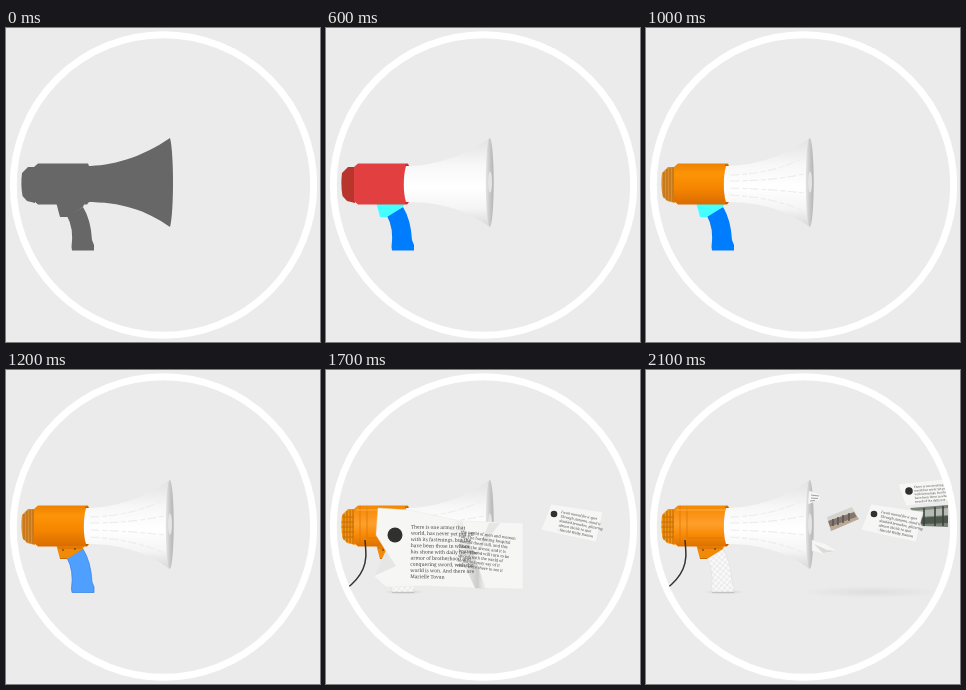
Animation of 314x314 px, one loop 3.1 s. Source, as an HTML page:

```html
<!DOCTYPE html>
<html lang="en">
<head>
<meta charset="utf-8">
<title>Megaphone</title>
<style>
  html, body { margin: 0; width: 100%; height: 100%; overflow: hidden; background: #ebebeb; }
  svg { display: block; width: 100%; height: 100%; }
  text { font-family: "Noto Serif", "Liberation Serif", serif; fill: #444; }
  .paper { fill: #f6f6f5; stroke: #e2e2e2; stroke-width: .4; }
  .mark { fill: #303030; }
</style>
</head>
<body>
<svg viewBox="0 0 314 314">
  <defs>
    <path id="cone" d="M80 138C105 138 135 130 164 110C168 125 168 184 164 199C140 182 115 174 80 174C77 165 77 148 80 138Z"/>
    <path id="body" d="M32 135.5H82L83 138V174L81 176.5H32L28 173V139Z"/>
    <path id="cap" d="M29 139H22L16 145Q14.5 157 16.5 168L21 173 29 175Z"/>
    <path id="bracket" d="M50 174H79L77 179 61 189H54Z"/>
    <path id="handle" d="M61 188L77 179Q85 192 86 212L88 217V222.5H66L65.5 219Q68 200 61 188Z"/>
    <path id="collar" d="M79 136.5H82L83 139V173L81 176H79Q81 174 80 173C77 165 77 148 80 139Z"/>
    <ellipse id="rim" cx="163.7" cy="154.5" rx="4" ry="44.5"/>
    <ellipse id="horn" cx="164" cy="154" rx="2" ry="10.5"/>

    <linearGradient id="white" x2="0" y2="1">
      <stop offset="0" stop-color="#e2e2e2"/><stop offset=".3" stop-color="#f7f7f7"/>
      <stop offset=".55" stop-color="#fff"/><stop offset=".8" stop-color="#f4f4f4"/>
      <stop offset="1" stop-color="#d8d8d8"/>
    </linearGradient>
    <linearGradient id="orange" x2="0" y2="1">
      <stop offset="0" stop-color="#ee8100"/><stop offset=".25" stop-color="#fd9406"/>
      <stop offset=".6" stop-color="#f58600"/><stop offset="1" stop-color="#d96c00"/>
    </linearGradient>
    <linearGradient id="bright" x2="0" y2="1">
      <stop offset="0" stop-color="#f58700"/><stop offset=".45" stop-color="#ff9f2c"/>
      <stop offset=".7" stop-color="#fa8b06"/><stop offset="1" stop-color="#dc7000"/>
    </linearGradient>
    <linearGradient id="metal">
      <stop offset="0" stop-color="#e8e8e8"/><stop offset=".5" stop-color="#c9c9c9"/>
      <stop offset="1" stop-color="#b4b4b4"/>
    </linearGradient>
    <linearGradient id="fold">
      <stop offset="0" stop-color="#fff" stop-opacity="0"/><stop offset=".8" stop-color="#aaa" stop-opacity=".55"/>
      <stop offset="1" stop-color="#ddd" stop-opacity=".2"/>
    </linearGradient>
    <radialGradient id="shade">
      <stop offset="0" stop-color="#888" stop-opacity=".35"/><stop offset="1" stop-color="#888" stop-opacity="0"/>
    </radialGradient>
    <pattern id="grip" width="4" height="4" patternUnits="userSpaceOnUse" patternTransform="rotate(40)">
      <path d="M0 0H4M0 0V4" stroke="#d9d9d9" stroke-width=".8"/>
    </pattern>
    <clipPath id="lens"><circle cx="157.5" cy="157" r="148"/></clipPath>
  </defs>

  <rect width="314" height="314" fill="#ebebeb"/>
  <g clip-path="url(#lens)">
    <g data-time="0 500" fill="#676767">
      <use href="#cap"/><use href="#body"/><use href="#cone"/><use href="#bracket"/><use href="#handle"/>
    </g>

    <ellipse data-time="2100" cx="225" cy="222" rx="70" ry="6" fill="url(#shade)" opacity=".4"/>
    <ellipse data-time="1300" cx="78" cy="222" rx="20" ry="2.5" fill="url(#shade)"/>

    <use data-time="500 1200" href="#handle" fill="#007cff"/>
    <use data-time="1200 1300" href="#handle" fill="#4f9fff" stroke="#2f7fe6" stroke-width=".7"/>
    <g data-time="1300">
      <use href="#handle" fill="#f9f9f9" stroke="#dedede" stroke-width=".6"/>
      <use href="#handle" fill="url(#grip)"/>
      <path d="M66 222.3H88" stroke="#bbb"/>
    </g>

    <use data-time="500 1100" href="#bracket" fill="#4ff"/>
    <g data-time="1100">
      <use href="#bracket" fill="#f18a08"/>
      <path d="M52 178H76M54 188.5L61 188.5" stroke="#c96a00" fill="none"/>
      <path d="M56 180H58M68 179H70" stroke="#8a4900" stroke-width="1.3"/>
    </g>

    <use data-time="500 1000" href="#cap" fill="#b7352d"/>
    <use data-time="1000 1400" href="#cap" fill="#dc8e2d"/>
    <use data-time="1400" href="#cap" fill="#f69410"/>
    <g data-time="1000" stroke="#a95e0c" fill="none">
      <path d="M18 144V170M21 141V172M24 140V173M27 139.5V174" stroke-width=".8"/>
      <path data-time="1400" d="M16 147H28M15.5 152H28M15.5 157H28M16 162H28M16.5 167H28" stroke="#c96c05"/>
    </g>

    <g data-time="500 800"><use href="#body" fill="#e23f40"/><use href="#collar" fill="#b02d30"/></g>
    <use data-time="800 1400" href="#body" fill="url(#orange)"/>
    <g data-time="1400">
      <use href="#body" fill="url(#bright)"/>
      <path d="M34 136V176M41 138V168M41 168H77" stroke="#d67309" stroke-width=".7" fill="none"/>
      <path d="M30 140H79" stroke="#ffb554" stroke-width=".8"/>
    </g>
    <use data-time="800" href="#collar" fill="#b95a05"/>

    <g data-time="500 600">
      <use href="#cone" fill="#ffb400"/><use href="#rim" fill="#adadad"/><use href="#horn" fill="#d0d0d0"/>
    </g>
    <g data-time="600">
      <use href="#cone" fill="url(#white)"/>
      <path data-time="700" d="M84 147Q125 146 155 131M84 153Q125 153 158 146M84 160Q125 161 158 165M84 167Q125 169 156 182"
        fill="none" stroke="#ededed" stroke-width="1.2" stroke-dasharray="9 3 5 2"/>
      <use href="#rim" fill="url(#metal)"/><use href="#horn" fill="#e4e4e4"/>
    </g>

    <path data-time="1500" d="M39 170C40 182 41 190 37 199C33 208 28 213 20 219" fill="none" stroke="#333" stroke-width="1.5"/>

    <g data-time="1600 1900" id="sheet">
      <path class="paper" d="M52 138L83 140 135 151 197 153V219L147 218 100 216 60 217 48 206 60 181 50 165Z"/>
      <path d="M118 151L136 151 160 219 149 218Z" fill="url(#fold)"/>
      <path d="M163 153L174 153 150 185Z" fill="#ccc" opacity=".4"/>
      <path d="M50 165L60 181 48 206 70 196Z" fill="#e6e6e6"/>
      <circle class="mark" cx="69" cy="165" r="7.5"/>
      <text data-lines="quote" transform="translate(85 158.5) rotate(1)" font-size="4.8" data-step="6.2"/>
      <text data-lines="aside" transform="translate(135 163) rotate(7)" font-size="3.9" data-step="4.8"/>
    </g>

    <g data-time="2000">
      <path class="paper" d="M252 114L300 109 305 130 260 136Z"/>
      <circle class="mark" cx="263" cy="121" r="3.8"/>
      <text data-lines="note" transform="translate(268 118) rotate(-4)" font-size="2.9" data-step="3.7"/>
    </g>
    <g data-time="1900">
      <path d="M264 138L302 135V157L276 156Z" fill="#7c837b"/>
      <path d="M266 141L302 138V145L271 147Z" fill="#b6bab4"/>
      <path d="M271 148L302 146V153L276 154Z" fill="#4d574b"/>
      <path d="M278 138V156M289 137V156M297 136V156" stroke="#3c443b" stroke-width="1.6"/>
    </g>
    <g data-time="1700">
      <path class="paper" d="M225 134L277 142 270 172 215 160Z"/>
      <circle class="mark" cx="228" cy="144" r="3.3"/>
      <text data-lines="verse" transform="translate(235 143) rotate(11)" font-size="3.4" data-step="4.5" font-style="italic"/>
    </g>
    <g data-time="2100">
      <path d="M181 147L206 137 213 149 185 161Z" fill="#d6d3cd"/>
      <path d="M182 151L208 142 211 147 184 157Z" fill="#85776d"/>
      <path d="M184 157L211 147 213 149 185 161Z" fill="#b9a893"/>
      <path d="M187 149V156M192 147V155M197 145V153M203 143V151" stroke="#55504f" stroke-width="1.4"/>
      <path class="paper" d="M163 121L174 124 174 130 162 134Z"/>
      <path d="M165 125L173 126M165 128L172 128.5M164 131L169 130.5" stroke="#777" stroke-width=".7"/>
      <path class="paper" d="M166 170L180 174 191 181 177 184 166 181Z"/>
      <path d="M168 174L181 180 190 181 177 183Z" fill="#dadada"/>
    </g>
  </g>
  <circle cx="157.5" cy="157" r="150.2" fill="none" stroke="#fff" stroke-width="7"/>
</svg>
<script>
  const LOOP = 3100;
  const copy = {
    quote: ["There is one armor that", "world, has never yet put off", "with its fastenings, but the", "have been those in whom",
      "has shone with daily use. The", "armor of brotherhood and", "conquering sword, with the", "world is won. And there are", "Marielle Tovan"],
    aside: ["the world of men and women", "off. The hardening hospital", "should there still, and this", "There the armor, and it is",
      "brotherhood will turn to be", "sword, with the wield of", "so the sea may say of it", "some were there to see it"],
    verse: ["I wait moved for a spot", "Through Autumn, cloud is", "doubled branches, glittering", "almost thistle to spot", "- Harold Welby Danton"],
    note: ["There is one morning left", "world has never yet put", "with fastenings, but the", "have been those in whom", "sword of the daily use"]
  };

  for (const text of document.querySelectorAll("[data-lines]")) {
    copy[text.dataset.lines].forEach((line, i) => {
      const span = document.createElementNS("http://www.w3.org/2000/svg", "tspan");
      span.setAttribute("x", 0);
      span.setAttribute("y", i * text.dataset.step);
      span.textContent = line;
      text.append(span);
    });
  }

  const layers = [...document.querySelectorAll("[data-time]")].map(node => {
    const [start, end = LOOP] = node.dataset.time.split(" ").map(Number);
    return { node, start, end };
  });
  const sheet = document.getElementById("sheet");
  const origin = performance.now();

  function draw(now) {
    const time = Math.max(0, now - origin) % LOOP;
    for (const { node, start, end } of layers) {
      node.style.display = time >= start && time < end ? "" : "none";
    }
    // The sheet first lies on the right, then snaps over the horn.
    sheet.setAttribute("transform", time < 1700 ? "translate(106 -2)" : "");
    requestAnimationFrame(draw);
  }
  draw(origin);
</script>
</body>
</html>
```
